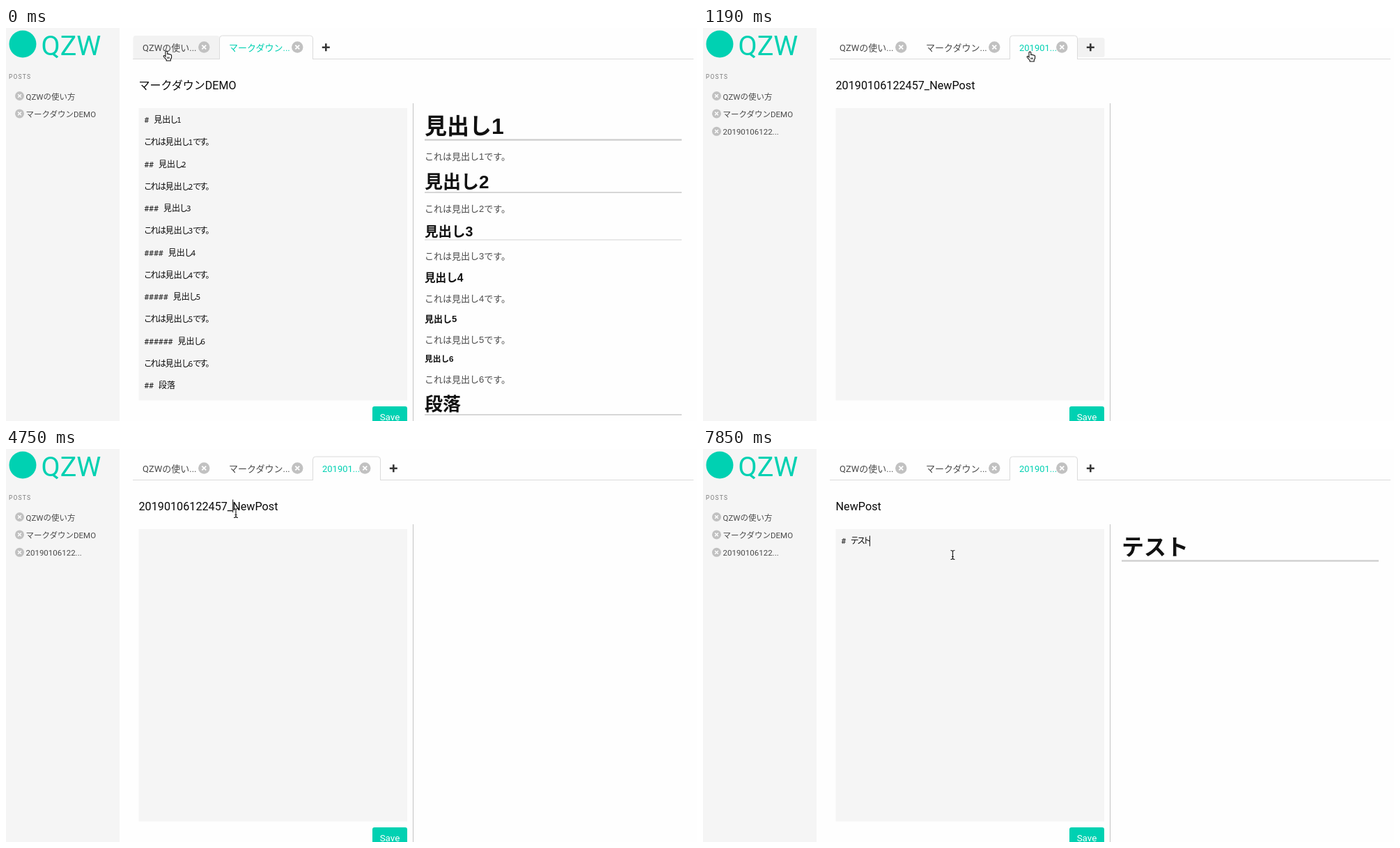
Recreate the animation shown at these times as an HTML page. Size 992 px wide and 564 px high, loop 8000 ms.

```html
<!DOCTYPE html>
<html lang="ja">
<head>
<meta charset="utf-8">
<title>Markdown editor</title>
<style>
  html, body { margin: 0; width: 100%; height: 100%; overflow: hidden; background: #fefefe; }
  svg { display: block; width: 992px; height: 564px; }
  text { font-family: Roboto, "Noto Sans CJK JP", "Noto Sans CJK", sans-serif; white-space: pre; fill: #4a4a4a; }
  .brand, .active { fill: #00d1b2; }
  .label { letter-spacing: 1.2px; fill: #7a7a7a; }
  .title { fill: #0a0a0a; }
  .save { fill: #fff; }
  .heading, .para { font-family: "Liberation Sans", "Noto Sans CJK JP", "Noto Sans CJK", sans-serif; }
  .heading { font-weight: 700; fill: #111; }
  .code { font-family: "Noto Sans CJK JP", "Noto Sans CJK", sans-serif; font-weight: 500; fill: #0a0a0a; }
  .ascii { font-family: "Noto Sans Mono", monospace; font-size: 11.45px; }
  .kana { font-feature-settings: "palt"; letter-spacing: -1.4px; }
</style>
</head>
<body>
<svg id="stage" viewBox="0 0 992 564"></svg>
<script>
const stage = document.getElementById('stage');
const TEAL = '#00d1b2', LOOP = 8000;
const TITLE_X = 190.5, CODE_X = 198.5, PREVIEW_X = 601;
const LONG_TITLE = '20190106122457_NewPost';

// Preview entries: [kind, centre y, text]
const docs = {
  demo: {
    title: 'マークダウンDEMO',
    pitch: 15.87,
    code: [1, 2, 3, 4, 5, 6].flatMap(n =>
      ['#'.repeat(n) + ' 見出し' + n, '', `これは見出し${n}です。`, '']).concat('## 段落'),
    preview: [
      ['h1', 140, '見出し1'], ['p', 184.5, 'これは見出し1です。'],
      ['h2', 220.5, '見出し2'], ['p', 259.5, 'これは見出し2です。'],
      ['h3', 292, '見出し3'], ['p', 327, 'これは見出し3です。'],
      ['h4', 358, '見出し4'], ['p', 388, 'これは見出し4です。'],
      ['h5', 417.5, '見出し5'], ['p', 447, 'これは見出し5です。'],
      ['h6', 475, '見出し6'], ['p', 504, 'これは見出し6です。'],
      ['h2', 539.5, '段落']
    ]
  },
  usage: {
    title: 'QZWの使い方',
    pitch: 16,
    code: `## 特長
QZWは、タブ機能を持ったマークダウンエディタです。
タブで作成した投稿を管理出来るため複数の投稿を保持し、スムーズに移動
できます。

## 基本的な使い方
投稿の作成や削除といった基本的な使い方を説明します。

### 新規作成
新規に投稿を行うには、タブの右端の**+**のマークをクリックしてください。

### 投稿の更新
投稿の更新を行うには、左のサイドバーから対象の投稿を選択しSAVEボタン
をクリックします。

### 投稿の削除
投稿の削除を行うには、左のサイドバーのxボタンをクリックします。

## ショートカット
Comming soon...`.split('\n'),
    preview: [
      ['h2', 136.5, '特長'],
      ['p', 176, 'QZWは、タブ機能を持ったマークダウンエディタです。 タブ'],
      ['p', 195.5, 'で作成した投稿を管理出来るため複数の投稿を保持し、スムー'],
      ['p', 215, 'ズに移動できます。'],
      ['h2', 250.5, '基本的な使い方'],
      ['p', 290, '投稿の作成や削除といった基本的な使い方を説明します。'],
      ['h3', 322, '新規作成'],
      ['p', 357, '新規に投稿を行うには、タブの右端の<tspan font-weight="700">+</tspan>のマークをクリックし'],
      ['p', 377, 'てください。'],
      ['h3', 409, '投稿の更新'],
      ['p', 444, '投稿の更新を行うには、左のサイドバーから対象の投稿を選択'],
      ['p', 464, 'しSAVEボタンをクリックします。'],
      ['h3', 496.5, '投稿の削除'],
      ['p', 531.5, '投稿の削除を行うには、左のサイドバーのxボタンをクリック'],
      ['p', 551, 'します。']
    ]
  }
};

// Kind: [font size, rule offset, rule thickness, rule colour]
const styles = {
  h1: [32, 20.5, 2.2, '#ccc'], h2: [26, 15.5, 1.6, '#ccc'], h3: [19.5, 12, 1, '#d4d4d4'],
  h4: [15.6], h5: [13], h6: [11.7], p: [13]
};

// Each step [time, changes] adds its changes to the state before it.
const left = [3880, 4020, 4170, 4310, 4460, 4610, 4750].map((time, i) => [time, { titleCaret: 21 - i }]);
const hashPreview = [['p', 131, '#']];
const steps = [
  [0, { doc: 'demo', active: 1, hover: 0, cursor: ['hand', 232, 40] }],
  [300, { doc: 'usage', active: 0, hover: null }],
  [450, { cursor: ['hand', 281, 41] }],
  [600, { cursor: ['hand', 372, 41], hover: 1 }],
  [740, { cursor: ['hand', 446, 41], hover: 'plus' }],
  [890, { cursor: ['hand', 471, 41] }],
  [1190, { doc: null, active: 2, title: LONG_TITLE, code: '', preview: [] }],
  [1340, { cursor: ['arrow', 463, 48], hover: null }],
  [1490, { cursor: ['arrow', 438, 58] }],
  [1640, { cursor: ['beam', 402, 71] }],
  [1790, { cursor: ['beam', 367, 82] }],
  [1930, { cursor: ['beam', 343, 91] }],
  [2080, { cursor: ['beam', 330, 96] }],
  [2230, { titleCaret: 22 }],
  [2680, { titleCaret: null, cursor: ['beam', 330, 92.5] }],
  [2980, { cursor: ['beam', 330, 92] }],
  [3280, { titleCaret: 22 }],
  [3730, { titleCaret: null }],
  ...left,
  [5050, { titleCaret: null, selected: 15 }],
  [5340, { title: 'NewPost', selected: 0, titleCaret: 0 }],
  [5640, { cursor: ['beam', 345, 122], titleCaret: null }],
  [5780, { cursor: ['beam', 358.5, 152] }],
  [5930, { codeCaret: true }],
  [6530, { codeCaret: false }],
  [6680, { code: '#', codeCaret: true, preview: hashPreview }],
  [6830, { code: '# ' }],
  [6970, { code: '# t', composing: true }],
  [7120, { code: '# て', popup: ['て', 'テスト', 'テキスト'] }],
  [7270, { code: '# てs' }],
  [7410, { code: '# てす', popup: ['テスト', 'です', 'テスト中'] }],
  [7560, { code: '# てすと', popup: ['テスト', 'テスト中', 'テストの'] }],
  [7710, { code: '# テスト' }],
  [7850, { composing: false, popup: null, preview: [['h1', 140, 'テスト']] }]
];
const states = [];
for (const [, changes] of steps) states.push({ ...states.at(-1), ...changes });

const rect = (x, y, w, h, fill, extra = '') =>
  `<rect x="${x}" y="${y}" width="${w}" height="${h}" fill="${fill}" ${extra}/>`;

// y is the vertical centre of the letters
const text = (x, y, size, str, cls = '', extra = '') =>
  `<text x="${x}" y="${y + size * 0.37}" font-size="${size}" class="${cls}" ${extra}>${str}</text>`;

function closeIcon(x, y, r) {
  const a = r * 0.36;
  return `<circle cx="${x}" cy="${y}" r="${r}" fill="#c1c1c1"/>
    <path d="M${x - a} ${y - a}l${2 * a} ${2 * a}m0 ${-2 * a}l${-2 * a} ${2 * a}" stroke="#fff" stroke-width="${r / 4.5}"/>`;
}

function sidebar(isNew) {
  const posts = ['QZWの使い方', 'マークダウンDEMO'];
  if (isNew) posts.push('20190106122...');
  return rect(0, 0, 163, 564, '#f5f5f5') +
    `<circle cx="24" cy="23" r="19.5" fill="${TEAL}"/>` +
    text(50.5, 24, 39.5, 'QZW', 'brand') +
    text(4, 70, 8.5, 'POSTS', 'label') +
    posts.map((name, i) => {
      const y = 98 + 25.4 * i;
      return closeIcon(19.5, y - 0.5, 6.5) + text(28.5, y + 0.4, 11.5, name);
    }).join('');
}

function tabs(state, isNew) {
  const list = [[182.5, 306.5, 'QZWの使い...'], [306.5, 440.5, 'マークダウン...']];
  if (isNew) list.push([440.5, 537.5, '201901...']);
  const plus = list.at(-1)[1] + 18.8;
  let out = '';
  if (state.hover === 'plus') out += rect(plus - 18.8, 14, 39, 28, '#f2f2f2', 'rx="3"');
  out += rect(182, 44, 805, 1, '#dbdbdb');
  list.forEach(([x, end, name], i) => {
    const active = i === state.active;
    const outline = `M${x} 45V15q0-4 4-4H${end - 4}q4 0 4 4V45`;
    if (active) out += `<path d="${outline}" fill="#fefefe" stroke="#dbdbdb"/>`;
    else if (i === state.hover) out += `<path d="${outline}" fill="#f2f2f2"/>` + rect(x, 44, end - x, 1, '#dbdbdb');
    out += text(x + 13.5, 28, 13, name, active ? 'active' : '') + closeIcon(end - 22.2, 27.5, 8.2);
  });
  return out + `<path d="M${plus - 5.5} 27.8h11m-5.5-5.5v11" stroke="#363636" stroke-width="2.6"/>`;
}

const codeSpans = line => line
  .replace(/[ -~]+|[ぁ-ヶー、。]+/g, run =>
    `<tspan class="${run < '\x7f' ? 'ascii' : 'kana'}">${run}</tspan>`);

const codeLines = (lines, pitch) =>
  lines.map((line, i) => text(CODE_X, 132 + i * pitch, 12, codeSpans(line), 'code')).join('');

const previewLines = entries => entries.map(([kind, y, str]) => {
  const [size, offset, thickness, colour] = styles[kind];
  const rule = offset ? rect(PREVIEW_X, y + offset - thickness / 2, 369, thickness, colour) : '';
  return text(PREVIEW_X, y, size, str, kind === 'p' ? 'para' : 'heading') + rule;
}).join('');

const cursors = {
  hand: `<path d="M-3 1V-5.4q0-1.5 1.4-1.5T-.2-5.4V-2.6q1-.8 2 .3 1.2-.6 1.9.5 1.9-.3 1.9 1.4V2.6L4.3 5V7H-1.8V5.4L-5.4 1.5q-1-1.6.3-2Q-4-.6-3 1zM0 1.5V4M2 1.5V4" fill="#fff" stroke="#111" stroke-width="1.1"/>`,
  arrow: `<path d="M-4-7V5L-1.3 2.5.4 6.6 2.4 5.7.8 1.8H4.3z" fill="#111" stroke="#fff" stroke-width=".8"/>`,
  beam: `<path d="M-3-6.5q3 0 3 2 0-2 3-2M0-5V5M-3 6.5q3 0 3-2 0 2 3 2M-1.5 2.5h3" fill="none" stroke="#222" stroke-width="1.2"/>`
};

function draw(state) {
  const isNew = !state.doc;
  const { title, code, preview, pitch = 16 } =
    isNew ? { ...state, code: [state.code] } : docs[state.doc];
  const [pointer, x, y] = state.cursor;

  stage.innerHTML = sidebar(isNew) + tabs(state, isNew) +
    '<g id="selection"></g>' + text(TITLE_X, 82.3, isNew ? 16.2 : 16, title, 'title', 'id="title"') +
    rect(190.5, 115, 385.5, 419.5, '#f5f5f5') + rect(584, 108, 1, 456, '#c4c4c4') +
    rect(526, 543, 50, 30, TEAL, 'rx="3"') + text(551, 558, 13.4, 'Save', 'save', 'text-anchor="middle"') +
    codeLines(code, pitch) + previewLines(preview) + '<g id="marks"></g>' +
    `<g transform="translate(${x} ${y})">${cursors[pointer]}</g>`;

  const titleText = document.getElementById('title');
  const titleWidth = count => count ? titleText.getSubStringLength(0, count) : 0;
  let marks = '';
  if (state.selected) {
    document.getElementById('selection').innerHTML =
      rect(TITLE_X, 72.5, titleWidth(state.selected), 18.5, '#b3d7fe');
  }
  if (state.titleCaret != null) {
    marks += rect(TITLE_X + titleWidth(state.titleCaret), 72.5, 1, 18.5, '#111');
  }
  const codeWidth = isNew ? stage.querySelector('.code').getComputedTextLength() : 0;
  if (state.composing) marks += rect(CODE_X + 13.7, 138.5, codeWidth - 13.7, 1, '#333');
  if (state.codeCaret) marks += rect(CODE_X + codeWidth, 124.5, 1, 15, '#111');
  if (state.popup) {
    marks += rect(200.5, 143.5, 160, 66, '#fafafa', 'stroke="#ddd" rx="2"') +
      state.popup.map((word, i) => text(212, 155 + i * 21, 12, word)).join('');
  }
  document.getElementById('marks').innerHTML = marks;
}

let shown = -1;
function tick() {
  const time = performance.now() % LOOP;
  const index = steps.findLastIndex(([start]) => start <= time);
  if (index !== shown) draw(states[shown = index]);
  requestAnimationFrame(tick);
}
tick();
</script>
</body>
</html>
```
